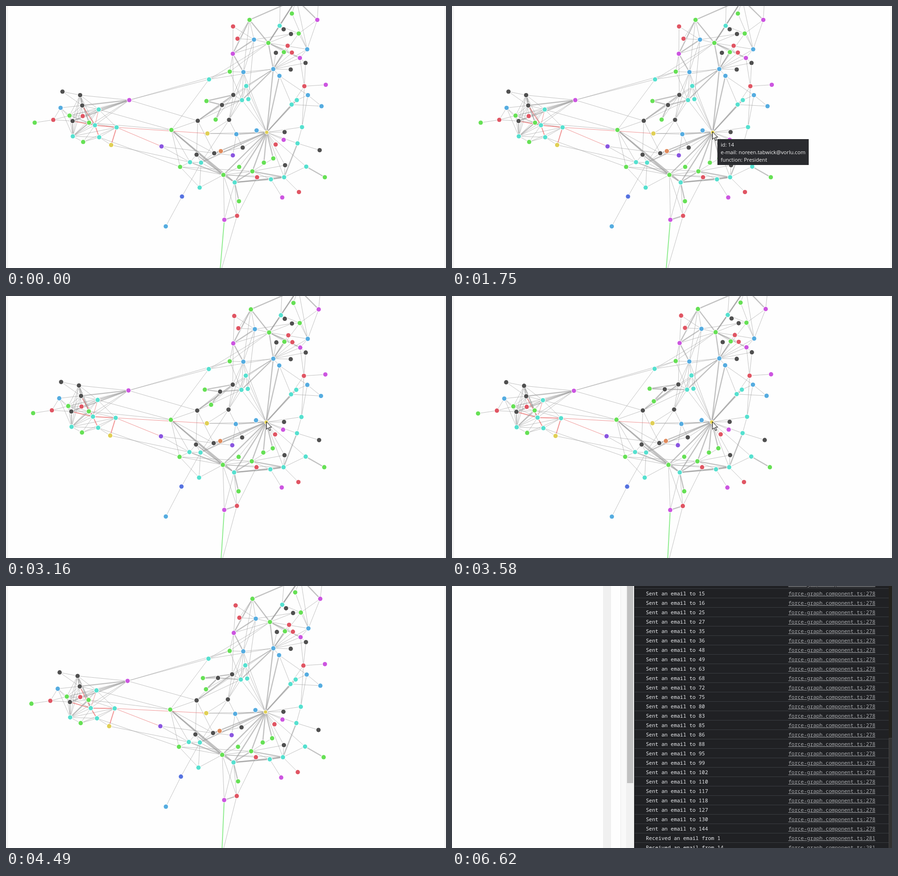
Animation of 935 by 557 pixels, one loop 8000 ms. Source, as an HTML page with a canvas:

```html
<!DOCTYPE html>
<html lang="en">
<head>
<meta charset="utf-8">
<title>Force graph</title>
<style>
  html, body { margin: 0; width: 100%; height: 100%; overflow: hidden; background: #fefefe; }
  canvas, #tip, #console, #cursor, .bar { position: absolute; }
  canvas { left: 0; top: 0; }
  #tip {
    left: 564px; top: 283px; width: 194px; height: 55px; box-sizing: border-box; padding: 4px 7px;
    background: #2a2b2f; color: #f2f2f2; font: 11.2px/16px "Open Sans", sans-serif; white-space: nowrap;
  }
  #console { inset: 0; background: #fefefe; overflow: hidden; }
  .bar { height: 557px; }
  #log { position: absolute; left: 387px; top: 0; width: 541px; height: 557px; background: #202124; overflow: hidden; }
  #rows { position: absolute; left: 1px; width: 540px; font: 11px/20px "Noto Sans Mono", monospace; color: #e8eaed; }
  .row { height: 20px; box-sizing: border-box; border-bottom: 1px solid #3a3d41; padding: 0 28.5px 0 24px; display: flex; justify-content: space-between; white-space: pre; }
  .row u { color: #a9abae; }
  #cursor { left: 0; top: 0; overflow: visible; }
</style>
</head>
<body>
<canvas id="graph" width="935" height="557"></canvas>
<div id="tip">id: 14<br>e-mail: noreen.tabwick@vorlu.com<br>function: President</div>
<div id="console">
  <div class="bar" style="left:321px;width:17px;background:#f0f0f0"></div>
  <div class="bar" style="left:358px;width:12px;background:#f9f9f9;box-shadow:inset 1px 0 #ebebeb"></div>
  <div class="bar" style="left:370px;width:17px;background:#f1f1f1"></div>
  <div class="bar" style="left:372px;width:13px;height:419px;background:#c1c1c1"></div>
  <div id="log"><div id="rows"></div></div>
  <div class="bar" style="left:928px;width:7px;background:#23211c"></div>
  <div class="bar" id="thumb" style="left:928px;width:7px;background:#333231;box-shadow:inset 1px 1px #474645"></div>
</div>
<svg id="cursor" width="12" height="20"><path d="M.5.5V16.5L4.2 13 7 19.2 9.4 18.2 6.6 12H11.6Z" fill="#fff" stroke="#000"/></svg>
<script>
const $ = id => document.getElementById(id);
const ctx = $('graph').getContext('2d');
const LOOP = 8000, STEP = 70, CLICK = 2880, SETTLED = 4490, CUT = 4560;

// After the click the layout leans: top to the right, left cluster outwards, the rest slightly back.
const driftX = (x, y) => Math.max(-2.5, 8 - y / 17, (y - 400) / 25 - 2.5) - Math.max(0, (330 - x) / 60);
const driftY = (x, y) => y / 150 - 2.5 + (x < 270 ? 3 : 0);

// Nodes are named by colour letter and index; loosely tied ones take an extra drift.
const nodes = {};
function dots(letter, color, ...points) {
  points.forEach(([x, y, extraX = 0, extraY = 0], i) => {
    nodes[letter + i] = { x, y, dx: driftX(x, y) + extraX, dy: driftY(x, y) + extraY, color, r: 4.6 };
  });
}
dots('k', '#505050',
  [120, 182], [157.5, 189.5], [162, 211.5], [141.5, 244.5], [590, 49.5], [605.5, 59.5], [573.5, 99.5],
  [636.5, 121], [605, 135], [483, 189], [459, 210.5, -6, -14], [407.5, 244], [474, 242], [592, 268],
  [503, 301], [442.5, 313], [405, 316], [593, 338.5], [666.5, 306.5]);
dots('r', '#e05563',
  [100.5, 242], [163, 234], [482.5, 43.5], [492, 69.5], [598.5, 84.5], [607.5, 99],
  [634, 170.5], [573, 294.5], [533.5, 364], [622.5, 395.5], [491, 446]);
dots('m', '#cc55e0',
  [262, 200], [482, 101.5], [661.5, 29.5], [624.5, 110.5], [679.5, 167.5], [590, 284.5], [587, 407], [464, 454.5]);
dots('b', '#55ace0',
  [116, 216.5], [527, 71.5], [504.5, 140.5], [568, 134], [581, 148.5], [640, 92],
  [641.5, 189.5], [670.5, 213], [489.5, 272.5], [532.5, 264.5], [339.5, 468.5]);
dots('g', '#66e055',
  [61, 248], [135, 233], [176.5, 248, 4, -8], [164, 289], [517.5, 29.5], [607.5, 16], [622, 58.5],
  [557.5, 78.5], [590.5, 98], [475.5, 139.5], [426, 202, -5, -5], [445.5, 241.5, -18, -21], [351.5, 263.5],
  [370, 342], [462, 359], [495.5, 342], [523.5, 351.5], [548, 333], [568, 324], [495, 415], [677.5, 364]);
dots('t', '#55e0cf',
  [197, 220], [189, 253.5, -4, 4], [235, 258], [142, 277], [198, 279], [431.5, 156], [581.5, 42],
  [510.5, 170], [501.5, 200], [515, 198], [607, 209.5], [618, 200], [629, 257.5], [619.5, 292],
  [638, 341.5], [591, 364], [563, 368.5], [486, 375], [391, 332], [414.5, 333], [411.5, 386]);
dots('y', '#e0cf55', [223.5, 295.5], [428, 271], [554, 268.5]);
dots('p', '#8a55e0', [330.5, 298.5], [482, 317.5]);
dots('o', '#e08a5c', [456.5, 308.5]);
dots('i', '#5572e0', [374, 405]);
dots('h', '#66e055', [617, -14], [665, -30], [583, -30], [454, 573]);
nodes.y2.r = 3.6;

// A later link between the same two nodes replaces the earlier one.
const links = new Map();
function link(from, to, width, color) {
  links.set([from, to].sort().join(), { a: nodes[from], b: nodes[to], width, color });
}
function mesh(names) {
  names.split(' ').forEach((from, i, all) => all.slice(i + 1).forEach(to => link(from, to, 1, GREY)));
}
function hub(name, reach) {
  const { x, y } = nodes[name];
  for (const [other, n] of Object.entries(nodes)) {
    if (other !== name && Math.hypot(n.x - x, n.y - y) < reach) link(name, other, 1, GREY);
  }
}
function connect(width, color, fans) {
  for (const [from, targets] of Object.entries(fans)) {
    for (const to of targets.split(' ')) link(from, to, width, color);
  }
}

const GREY = 'rgba(153,153,153,.6)', RED = 'rgba(232,80,80,.6)', GREEN = 'rgba(100,230,100,.7)';
mesh('k1 k2 k3 t0 t1 t3 g1 g2');
hub('b3', 72);
hub('y2', 82);
connect(1, GREY, {
  r0: 'g0 b0 k3 g1', b0: 'g1 k3 k2 t3', k0: 'k1 k2', r1: 'k1 t0 g1',
  m0: 'k1 t0 g1 t1 t3 t5 g9 k11', t2: 't0 g2 t3 t4 g3', t4: 't1 t3 g3 y0 g13', g3: 't3 t1', y0: 't18',
  h0: 'g5 b5', h1: 'm2', h2: 't6', r2: 'm1 b1', g4: 'r3 b1 b2', b1: 'r3 g7 k5 b2 t9',
  m1: 'g7 g9 k9', g7: 'k5 r5 g8 b5 t5 g9', g6: 't6 k5 b5 m2 b3', b5: 'm2 m3 b3 g5',
  k7: 'm3 r6', r6: 'm3 m4 t12 t10', b6: 'b4 b7 t12 t11', t10: 'b4 b7 t11',
  t5: 'b3 g9 g12', b2: 't7 g9 k9 t8 k12', t7: 't8 t9 k12', t8: 'g9 k9 k12', k9: 'b3 k12 g11',
  k11: 'k10 t8 b3 g12 k16 k15', k12: 'b8 y1 t19', y1: 'b8 y2',
  y2: 'b2 t7 t8 g15 t14 t15 k17', b8: 'k14 p1',
  g12: 't0 g2 k15 g13 t18', t19: 'k16 t18 i0 g14 t20', k15: 'o0 p0 p1 k14 t19', t18: 'p0 g13 k16',
  i0: 'b10', t20: 'g13 g14', g14: 'g13 g15 g16 m7 r10 r8 t15', g16: 'g13 k17 g18 t16',
  t17: 'm7 r10', t15: 'k17 t14 r9', t13: 't12 k18', t16: 'm6', r10: 'r8 h3',
});
connect(2.4, GREY, {
  k2: 'k1 m0', g2: 'k1 t3', k3: 'm0 t3', t0: 'm0',
  h0: 'g4 g7 m2 t6', g4: 'g7 m1', m1: 'b1 b2', g7: 'b3 m3 t6', b3: 'g8 t8',
  g10: 'k9 k10', k10: 'g11 t8', k9: 'k11',
  y2: 'b3 b4 t10 t11 b8 g18 g17 g16 t17 g14 k15 t19',
  g12: 'g14 t17', g14: 't17 t18 k16', t17: 'g16 g19 t15 t16', t15: 'g16 t13 t16', t14: 'g20', r10: 'm7',
});
connect(2, RED, { t1: 'k2 k3 t2 t4', t2: 'y0' });
connect(1, RED, { t2: 'p0 y1', t0: 't1' });
connect(2, GREEN, { m7: 'h3' });

// console lines
const sent = [12, 15, 16, 25, 27, 35, 36, 48, 49, 63, 68, 72, 75, 80, 83, 85, 86, 88, 95, 99, 102, 110, 117, 118, 127, 130, 144];
const received = [1, 14, 97, 123, 134];
const row = (text, line) => `<div class="row"><span>${text}</span><u>force-graph.component.ts:${line}</u></div>`;
$('rows').innerHTML = sent.map(n => row('Sent an email to ' + n, 278)).join('')
  + received.map(n => row('Received an email from ' + n, 281)).join('');

function disc(x, y, r, fill) {
  ctx.beginPath();
  ctx.arc(x, y, r, 0, 7);
  ctx.fillStyle = fill;
  ctx.fill();
}

function strip(x, width, fill) {
  ctx.fillStyle = fill;
  ctx.fillRect(x, 0, width, 557);
}

const relax = ms => 1 - Math.exp(-2.2 * ms / 1000);

function drawGraph(t) {
  const elapsed = Math.max(0, Math.min(t, SETTLED) - CLICK);
  const p = relax(Math.floor(elapsed / STEP) * STEP) / relax(SETTLED - CLICK);
  const px = n => n.x + n.dx * p, py = n => n.y + n.dy * p;

  strip(0, 935, '#f7f7f7');
  strip(3, 930, '#eeeeee');
  strip(4, 928, '#fefefe');

  for (const { a, b, width, color } of links.values()) {
    ctx.beginPath();
    ctx.moveTo(px(a), py(a));
    ctx.lineTo(px(b), py(b));
    ctx.lineWidth = width;
    ctx.strokeStyle = color;
    ctx.stroke();
  }
  for (const n of Object.values(nodes)) {
    disc(px(n), py(n), n.r + 1.15, '#fff');
    disc(px(n), py(n), n.r, n.color);
  }
  if (t >= CLICK && t < CLICK + 2 * STEP) disc(553, 267, 12.5, 'rgba(250,236,50,.75)');
}

function placeCursor(t) {
  const k = Math.max(0, Math.min(8, Math.floor((t - 660) / STEP))) / 8;
  const e = 1 - (1 - k) ** 2;
  const curve = (a, b, c) => a * (1 - e) ** 2 + 2 * b * e * (1 - e) + c * e * e;
  const [x, y] = t < CUT ? [curve(591, 628, 553), curve(520, 420, 267)] : [201, 468];
  const shown = (t >= 660 && t < 3720) || (t >= CUT && t < 4950);
  $('cursor').style.transform = `translate(${x}px, ${y}px)`;
  $('cursor').style.opacity = !shown ? 0 : t >= 4890 ? .5 : 1;
}

function frame(now) {
  const t = now % LOOP;
  const scrolled = t >= 6620;
  drawGraph(t);
  placeCursor(t);
  $('tip').hidden = t < 1750 || t >= CLICK + STEP;
  $('console').hidden = t < CUT;
  $('rows').style.top = (scrolled ? -14 : -82) + 'px';
  $('thumb').style.top = (scrolled ? 323 : 205) + 'px';
  requestAnimationFrame(frame);
}
requestAnimationFrame(frame);
</script>
</body>
</html>
```
